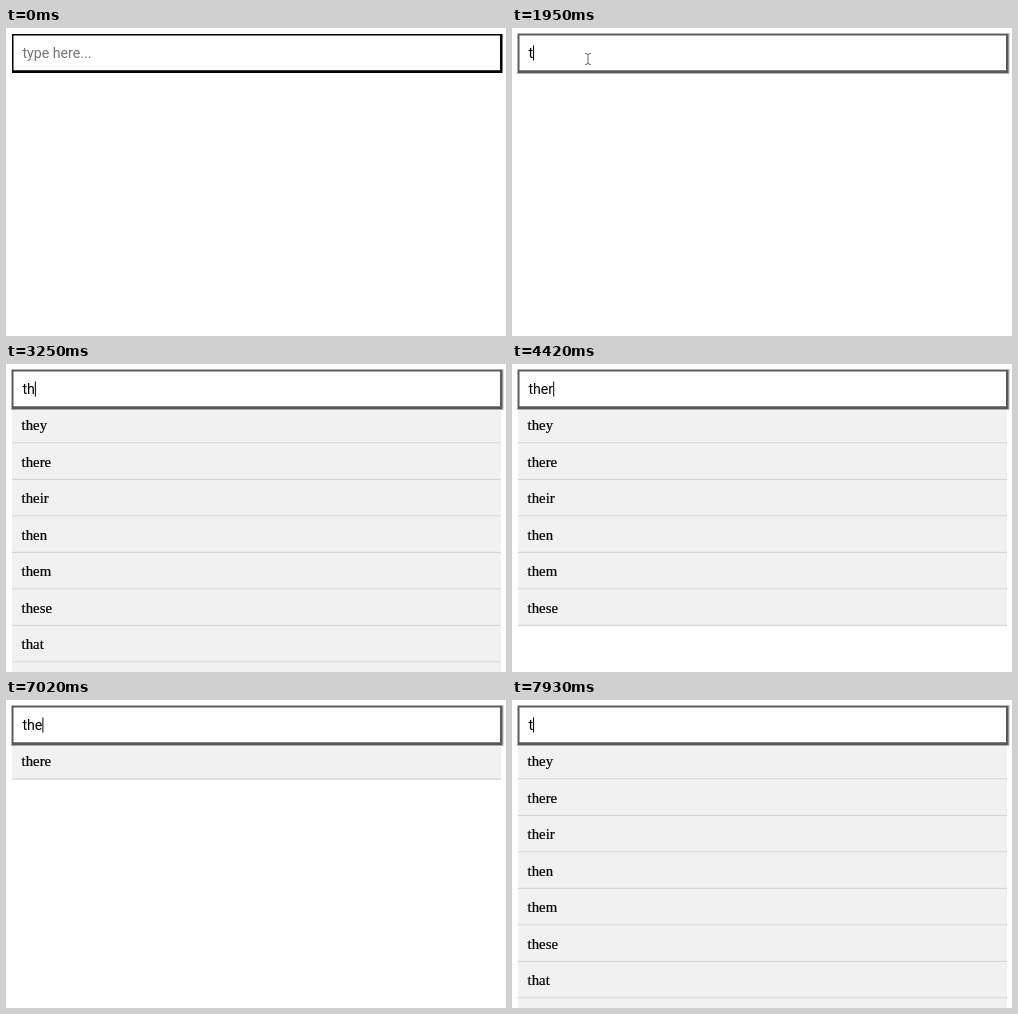
Animation, 500 px wide and 308 px high, one loop 8 s. Source, as an HTML page:

```html
<!DOCTYPE html>
<html lang="en">
<head>
<meta charset="utf-8">
<title>Autocomplete</title>
<style>
  html, body { margin: 0; width: 100%; height: 100%; overflow: hidden; background: #fff; }
  svg { display: block; width: 500px; height: 308px; }
  .field { font: 14.2px Roboto, Arial, sans-serif; }
  .row { font: 14.8px "Liberation Serif", "Times New Roman", serif; stroke: #000; stroke-width: .2px; }
</style>
</head>
<body>
<svg viewBox="0 0 500 308">
  <g id="list"></g>
  <rect id="ring" x="5.5" y="5.5" width="491.5" height="40" fill="none" stroke="#000" stroke-opacity=".3"/>
  <path id="frame" fill-rule="evenodd" d="M6 6H496.5V45H6Z M7.5 7.6H494V42.3H7.5Z"/>
  <text id="hint" class="field" x="16.4" y="30" fill="#757575">type here...</text>
  <text id="typed" class="field" x="16.4" y="30"></text>
  <path id="spell" d="M17 31.8H41.5" stroke="#d0383f" stroke-width="1.5" stroke-dasharray="1.6 1.1"/>
  <rect id="caret" y="17.5" width="1" height="15"/>
  <path id="arrow" d="M0 0V11.2L2.6 8.8L4.3 12.6L6 11.9L4.4 8.2H8Z" stroke="#fff" stroke-width=".8"/>
  <path id="beam" d="M-3 -5.5Q0 -5.5 0 -4Q0 -5.5 3 -5.5M0 -4V4M-3 5.5Q0 5.5 0 4Q0 5.5 3 5.5" fill="none" stroke="#666"/>
</svg>
<script>
const LOOP = 8000, TICK = 130, FOCUS = 1040, HIDE_POINTER = 2990;
const PITCH = 36.5, TOP = 45;
const ALL = ["they", "there", "their", "then", "them", "these", "that", "this"];
const THE = ALL.slice(0, 6);

// start time, typed text, suggestions, caret visible, misspelling mark
const steps = [
  [0, "", [], 0],
  [1040, "", [], 1],
  [1560, "", [], 0],
  [1950, "t", [], 1],
  [2080, "t", ALL, 1],
  [2600, "t", ALL, 0],
  [2990, "t", ALL, 1],
  [3250, "th", ALL, 1],
  [3770, "th", ALL, 0],
  [4030, "the", ALL, 1],
  [4160, "the", THE, 1],
  [4420, "ther", THE, 1],
  [4550, "ther", ["there"], 1],
  [4940, "ther", ["there"], 0],
  [5460, "ther", ["there"], 1, 1],
  [5590, "there", ["there"], 1],
  [6110, "there", ["there"], 0],
  [6630, "ther", ["there"], 1],
  [7020, "the", ["there"], 1],
  [7150, "the", THE, 1],
  [7410, "th", THE, 1],
  [7540, "th", ALL, 1],
  [7930, "t", ALL, 1]
];

const el = id => document.getElementById(id);
const show = (id, on) => el(id).setAttribute("visibility", on ? "visible" : "hidden");

function add(parent, tag, attrs, text = "") {
  const node = document.createElementNS("http://www.w3.org/2000/svg", tag);
  for (const key in attrs) node.setAttribute(key, attrs[key]);
  node.textContent = text;
  parent.appendChild(node);
}

function drawList(words) {
  const list = el("list");
  list.replaceChildren();
  words.forEach((word, i) => {
    const y = TOP + i * PITCH - (i ? 2 : 0);
    const end = TOP + (i + 1) * PITCH - 2;
    add(list, "rect", { x: 6, y, width: 489, height: end - y, fill: "#f1f1f1" });
    add(list, "rect", { x: 6, y: end - 1.2, width: 489, height: 1.3, fill: "#d6d6d6" });
    add(list, "text", { class: "row", x: 15.6, y: 66 + i * PITCH }, word);
  });
}

function drawPointer(t) {
  const tick = Math.floor(t / TICK) * TICK;
  const p = Math.min(1, Math.max(0, (tick - 260) / 650));
  const ease = 1 - (1 - p) ** 2;
  const x = 112 - 36 * ease, y = 105 - 74 * ease;
  const on = t >= 260 && t < HIDE_POINTER, inside = y < 45;
  for (const id of ["arrow", "beam"]) el(id).setAttribute("transform", `translate(${x} ${y})`);
  show("arrow", on && !inside);
  show("beam", on && inside);
}

let shown = null;
function draw(t) {
  drawPointer(t);
  const step = steps.findLast(s => s[0] <= t);
  if (step === shown) return;
  shown = step;
  const [start, text, words, caret, spell] = step;
  const focused = start >= FOCUS;
  drawList(words);
  el("typed").textContent = text;
  el("frame").setAttribute("fill", focused ? "#595959" : "#000");
  const width = text ? el("typed").getComputedTextLength() : 0;
  el("caret").setAttribute("x", 16.4 + width);
  show("ring", focused);
  show("hint", !text);
  show("caret", caret);
  show("spell", spell);
}

const origin = performance.now();
function loop() {
  draw((performance.now() - origin) % LOOP);
  requestAnimationFrame(loop);
}
loop();
</script>
</body>
</html>
```
